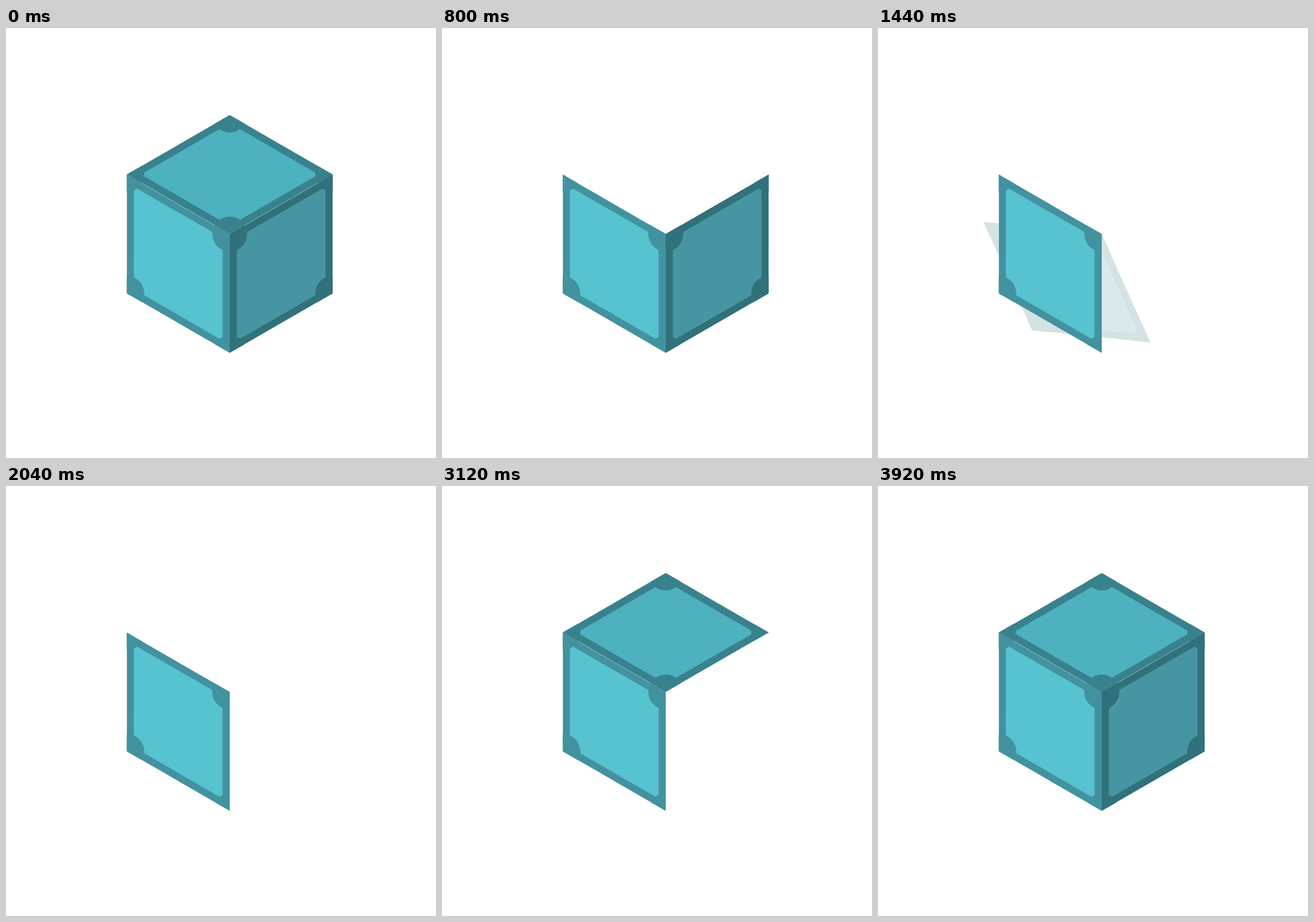
Animation, 640 px wide and 640 px high, one loop 4680 ms. Source, as an HTML page:

```html
<!DOCTYPE html>
<html lang="en">
<head>
<meta charset="utf-8">
<title>Folding cube</title>
<style>
  html, body { margin: 0; width: 100%; height: 100%; overflow: hidden; background: #fff; }
  svg { display: block; width: 100%; height: 100%; }
</style>
</head>
<body>
<svg viewBox="0 0 640 640">
  <defs>
    <clipPath id="rhombus"><path d="M0 0 153.3-88.5 0-177-153.3-88.5Z"/></clipPath>
    <!-- fill is the rim colour, color is the panel colour -->
    <g id="face" clip-path="url(#rhombus)">
      <path d="M0 0 153.3-88.5 0-177-153.3-88.5Z"/>
      <path d="M0-12.2 132.1-88.5 0-164.8-132.1-88.5Z" fill="currentColor"/>
      <circle r="26"/>
      <circle r="26" cy="-177"/>
      <circle r="26" cx="153.3" cy="-88.5"/>
      <circle r="26" cx="-153.3" cy="-88.5"/>
    </g>
  </defs>
  <g transform="translate(333 306.5)">
    <use id="top" href="#face" fill="#38828d" color="#4eb1bf"/>
    <use id="right" href="#face" fill="#30717a" color="#4795a3"/>
    <use href="#face" fill="#42929f" color="#57c2d0" transform="rotate(-120)"/>
  </g>
</svg>
<script>
const LOOP = 4680, STEP = 40, MOVE = 735;

// rest: resting angle; leave/enter: start times; outTurn/inTurn: degrees swept
const faces = [
  { id: 'top', rest: 0, leave: 79, outTurn: 120, enter: 2383, inTurn: 60 },
  { id: 'right', rest: 120, leave: 853, outTurn: 120, enter: 3157, inTurn: 120 },
];
for (const face of faces) face.node = document.getElementById(face.id);

const progress = (time, start) => Math.min(1, Math.max(0, (time - start) / MOVE));

function draw(now) {
  const time = Math.floor(now % LOOP / STEP) * STEP;
  for (const { node, rest, leave, outTurn, enter, inTurn } of faces) {
    const out = progress(time, leave), back = progress(time, enter);
    const turn = back > 0 ? (back - 1) * inTurn : out * outTurn;
    node.setAttribute('transform', `rotate(${rest + turn})`);
    node.setAttribute('opacity', 1 - out + back);
  }
  requestAnimationFrame(draw);
}
draw(performance.now());
</script>
</body>
</html>
```
